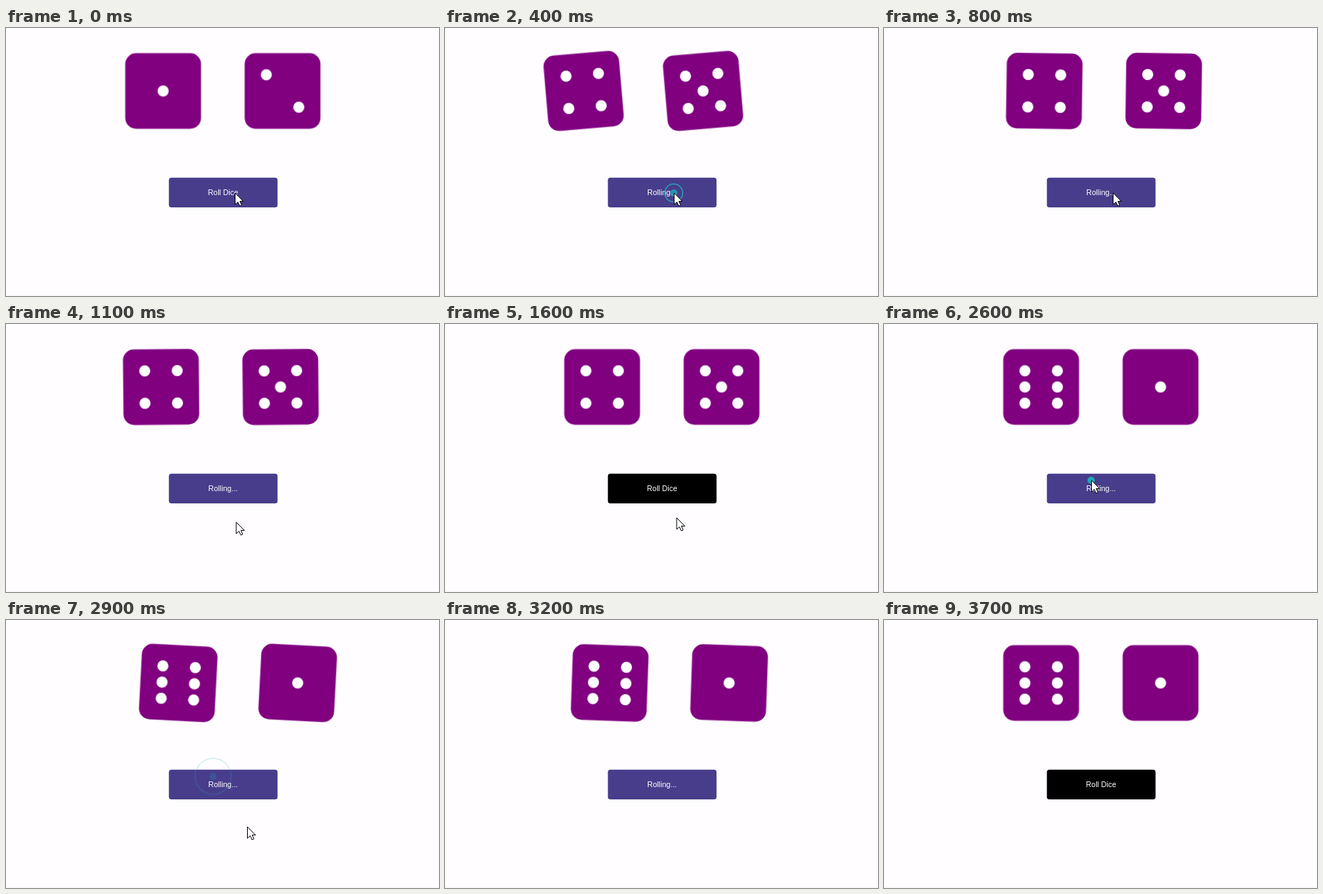
Animation of 600 by 372 pixels, one loop 3800 ms. Source, as an HTML page:

```html
<!DOCTYPE html>
<html lang="en">
<head>
<meta charset="utf-8">
<title>Dice roller</title>
<style>
  html, body { margin: 0; width: 100%; height: 100%; overflow: hidden; background: #fffdff; }
  svg { display: block; }
  .die { transform-box: view-box; fill: purple; }
  .die circle { fill: #fff; }
  text { font: 10.5px "Liberation Sans", Arial, sans-serif; fill: #fff; text-anchor: middle; }
</style>
</head>
<body>
<svg width="600" height="372" viewBox="0 0 600 372">
  <rect y="371" width="600" height="1" fill="#f7f5f7"/>
  <g transform="translate(217.7 87.4)"><g class="die"></g></g>
  <g transform="translate(383.2 87.4)"><g class="die"></g></g>
  <rect id="button" x="225.7" y="207.7" width="150.6" height="41.2" rx="3.5"/>
  <text id="label" x="300.8" y="232"></text>
  <g id="ripple" fill="none" stroke="#1fb5c4" stroke-width="1.5">
    <circle id="ring"/>
    <circle r="5" fill="#1fa5b8" stroke="none"/>
  </g>
  <path id="cursor" d="M0 0V16L3.9 12.6L6.4 18L9 16.9L6.6 11.5H11.3Z" fill="#fff" stroke="#000"/>
</svg>
<script>
const LOOP = 3800, STEP = 100, SIZE = 105;
const $ = id => document.getElementById(id);
const dice = [...document.querySelectorAll('.die')];

// Each roll: wobble start, first and last moment of the rolling state, faces, click point
const rolls = [
  { start: 280, from: 300, to: 1300, faces: [4, 5], at: [317, 229] },
  { start: 2600, from: 2600, to: 3700, faces: [6, 1], at: [287, 217] }
];

// Cursor tip: time, x, y
const path = [
  [0, 317.5, 229], [900, 317.5, 229], [1100, 319, 275], [1400, 322, 362],
  [1500, 322, 325], [1600, 321, 269], [1700, 312, 228], [1900, 292, 179],
  [2000, 288, 182], [2200, 287.5, 217], [2700, 287.5, 217], [2900, 334.5, 287]
];
const CURSOR_END = 3000;

// Wobble: offset, shift in die widths, rotation in degrees
const wobble = [
  [0, 0, 0], [.15, -.25, -5], [.3, .2, 3], [.45, -.15, -3],
  [.6, .1, 2], [.75, -.05, -1], [1, 0, 0]
].map(([offset, shift, turn]) => ({
  offset, easing: 'ease',
  transform: `translate(${shift * SIZE}px, 0px) rotate(${turn}deg)`
}));

const shakes = dice.map(die => {
  die.style.transformOrigin = '0 0';
  const shake = die.animate(wobble, { duration: 1000, fill: 'both' });
  shake.pause();
  return shake;
});

function pips(n) {
  const spots = [];
  if (n % 2) spots.push([0, 0]);
  if (n > 1) spots.push([-1, -1], [1, 1]);
  if (n > 3) spots.push([1, -1], [-1, 1]);
  if (n === 6) spots.push([-1, 0], [1, 0]);
  return spots;
}

function drawDie(die, n) {
  if (die.dataset.face === String(n)) return;
  die.dataset.face = n;
  die.innerHTML =
    `<rect x="${-SIZE / 2}" y="${-SIZE / 2}" width="${SIZE}" height="${SIZE}" rx="15"/>` +
    pips(n).map(([x, y]) => `<circle cx="${x * 22.5}" cy="${y * 22.5}" r="7.7"/>`).join('');
}

function tipAt(t) {
  const i = path.findIndex(p => p[0] > t);
  if (i < 0) return path[path.length - 1].slice(1);
  const [t0, x0, y0] = path[i - 1], [t1, x1, y1] = path[i];
  const k = (t - t0) / (t1 - t0);
  return [x0 + (x1 - x0) * k, y0 + (y1 - y0) * k];
}

function draw(t) {
  const roll = rolls.filter(r => t >= r.from).pop();
  const rolling = !!roll && t < roll.to;
  const faces = roll ? roll.faces : [1, 2];
  const age = roll ? t - roll.start : Infinity;

  dice.forEach((die, i) => {
    drawDie(die, faces[i]);
    shakes[i].currentTime = rolling ? Math.min(age, 1000) : 0;
  });

  const [x, y] = tipAt(t);
  const shown = t < CURSOR_END;
  $('cursor').setAttribute('transform', `translate(${x} ${y})`);
  $('cursor').style.display = shown ? '' : 'none';

  const hover = shown && x > 226 && x < 376 && y > 208 && y < 249;
  $('button').setAttribute('fill', hover || rolling ? 'darkslateblue' : '#000');
  $('label').textContent = rolling ? 'Rolling...' : 'Roll Dice';

  const active = age < 330;
  $('ripple').style.display = active ? '' : 'none';
  if (active) {
    $('ripple').setAttribute('transform', `translate(${roll.at})`);
    $('ripple').setAttribute('opacity', Math.min(1, 1.25 - age / 290));
    $('ring').setAttribute('r', 4 + age * .07);
  }
}

function frame() {
  const t = Math.floor(performance.now() % LOOP / STEP) * STEP;
  draw(t < 300 ? 0 : t);
  requestAnimationFrame(frame);
}
frame();
</script>
</body>
</html>
```
